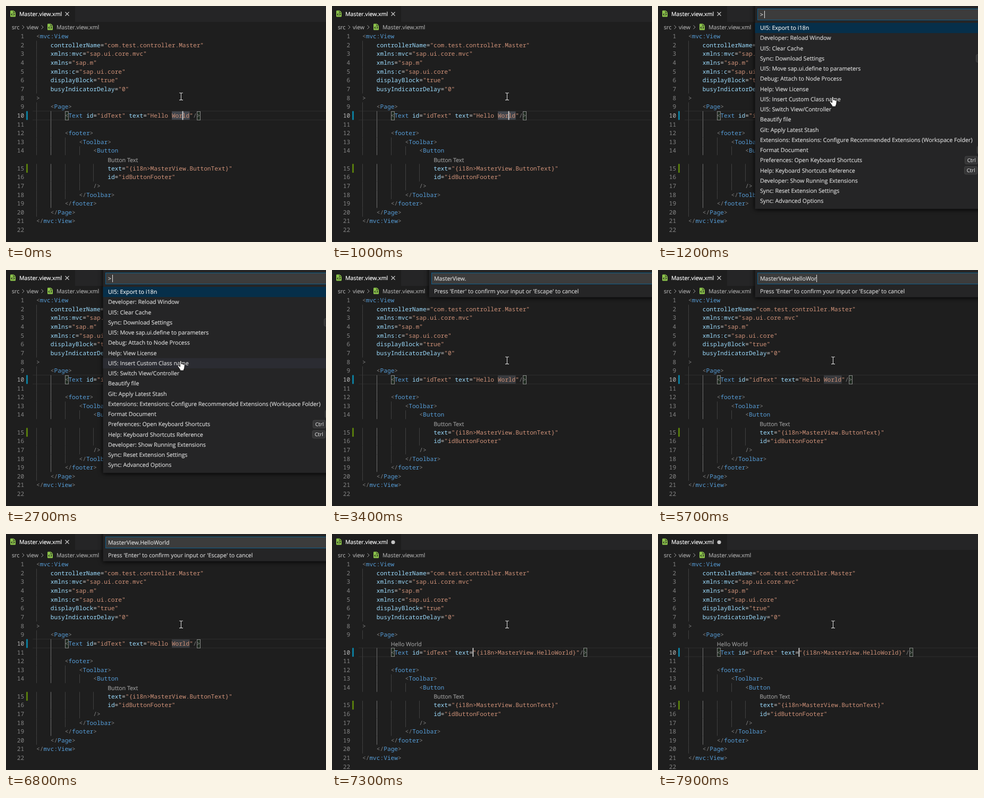
Recreate the animation shown at these times as an HTML page. Size 602x446 px, loop 8000 ms.

```html
<!DOCTYPE html>
<html lang="en">
<head>
<meta charset="utf-8">
<title>Export to i18n</title>
<style>
  html, body { margin: 0; width: 100%; height: 100%; overflow: hidden; background: #1e1e1e; }
  svg { display: block; width: 602px; height: 446px; }
  text { white-space: pre; text-rendering: geometricPrecision; }
  .code { font: 11.18px "Noto Sans Mono", "DejaVu Sans Mono", monospace; }
  .ui { font: 10.66px "Open Sans", "Noto Sans", sans-serif; stroke-width: .2px; }
  .ui.small { font-size: 9.6px; }
  .popup { filter: drop-shadow(0 1px 4px #000); }
</style>
</head>
<body>
<svg id="stage" viewBox="0 0 602 446"></svg>
<script>
const LOOP = 8000;
const CHAR = 6.71, LEFT = 57, LINE = 16.63, FIRST = 57.3;
const OPEN = 1100, HOVER = 1300, PROMPT = 2850, CLOSE = 6880, EDIT = 6980, LENS = 7280;

const COLORS = { punct: '#808080', tag: '#569cd6', attr: '#9cdcfe', string: '#ce9178', plain: '#d4d4d4' };

const SOURCE = `<mvc:View
    controllerName="com.test.controller.Master"
    xmlns:mvc="sap.ui.core.mvc"
    xmlns="sap.m"
    xmlns:c="sap.ui.core"
    displayBlock="true"
    busyIndicatorDelay="0"
>
    <Page>
        <Text id="idText" text="Hello World"/>

        <footer>
            <Toolbar>
                <Button
                    text="{i18n>MasterView.ButtonText}"
                    id="idButtonFooter"
                />
            </Toolbar>
        </footer>
    </Page>
</mvc:View>
`.split('\n');

const COMMANDS = [
  'UI5: Export to i18n', 'Developer: Reload Window', 'UI5: Clear Cache', 'Sync: Download Settings',
  'UI5: Move sap.ui.define to parameters', 'Debug: Attach to Node Process', 'Help: View License',
  'UI5: Insert Custom Class name', 'UI5: Switch View/Controller', 'Beautify file',
  'Git: Apply Latest Stash',
  'Extensions: Extensions: Configure Recommended Extensions (Workspace Folder)',
  'Format Document', 'Preferences: Open Keyboard Shortcuts', 'Help: Keyboard Shortcuts Reference',
  'Developer: Show Running Extensions', 'Sync: Reset Extension Settings', 'Sync: Advanced Options'
];
// Left edge of the shortcut badge, by command index
const BADGES = { 3: 598.5, 12: 600.5, 13: 577.5, 14: 576.5 };

// [column, first line, last line]
const GUIDES = [[0, 2, 7], [0, 9, 20], [4, 10, 19], [8, 13, 18], [12, 14, 17], [16, 15, 16]];
const ACTIVE_COLUMN = 4;

const TYPED = 'HelloWorld';
const KEY_TIMES = [4480, 4580, 4680, 4780, 4970, 5280, 5480, 5680, 5780, 5870];

const escapeXml = s => s.replace(/&/g, '&amp;').replace(/</g, '&lt;').replace(/>/g, '&gt;');
const rect = (x, y, w, h, fill, extra = '') =>
  `<rect x="${x}" y="${y}" width="${w}" height="${h}" fill="${fill}" ${extra}/>`;
const path = (d, stroke, width = 1, fill = 'none') =>
  `<path d="${d}" stroke="${stroke}" stroke-width="${width}" fill="${fill}"/>`;
const label = (x, centre, s, fill, size = '') =>
  `<text class="ui ${size}" x="${x}" y="${centre + 3.7}" fill="${fill}" stroke="${fill}">${escapeXml(s)}</text>`;
const colX = col => LEFT + col * CHAR;
const blink = (elapsed, half) => Math.floor(Math.max(0, elapsed) / half) % 2 === 0;

function highlight(line) {
  const rule = /(<\/?|\/?>)|("[^"]*")|([\w:]+)|([\s=]+)/g;
  let previous = '';
  return line.replace(rule, (token, punct, string, word) => {
    const kind = punct ? 'punct' : string ? 'string'
      : word ? (previous.startsWith('<') ? 'tag' : 'attr') : 'plain';
    previous = token;
    return `<tspan fill="${COLORS[kind]}">${escapeXml(token)}</tspan>`;
  });
}

const fileIcon = (x, y) => `<g transform="translate(${x} ${y})">
  <path d="M1.2 0H6.6L10 3.4V10.8Q10 12 8.8 12H1.2Q0 12 0 10.8V1.2Q0 0 1.2 0Z" fill="#8bc34a"/>
  ${path('M6 .9V4H9.2', '#1e1e1e', .9)}
  ${path('M3.9 5.6L2.1 7.5L3.9 9.4M6.1 5.6L7.9 7.5L6.1 9.4', '#1e1e1e', 1.1)}</g>`;

function header(dirty) {
  const chevron = x => path(`M${x} 36.5l3.5 3.5l-3.5 3.5`, '#a0a0a0');
  return rect(0, 0, 602, 30, '#252526') + rect(0, 0, 130, 30, '#1e1e1e')
    + fileIcon(8, 8.5) + label(25, 15.3, 'Master.view.xml', '#fff')
    + (dirty ? '<circle cx="115" cy="15.5" r="3.6" fill="#c5c5c5"/>'
             : path('M111.5 11.5l7 7m0-7l-7 7', '#d0d0d0', 1.1))
    + label(11, 40, 'src', '#a9a9a9') + chevron(30.5)
    + label(39, 40, 'view', '#a9a9a9') + chevron(66.5)
    + fileIcon(78, 33.5) + label(95, 40, 'Master.view.xml', '#a9a9a9');
}

function editor({ edited, lens, focused, caret }) {
  const lines = SOURCE.slice();
  if (edited) lines[9] = lines[9].replace('Hello World', '{i18n>MasterView.HelloWorld}');
  const centre = n => FIRST + LINE * (n - 1 + (n >= 15) + (lens && n >= 10));
  const active = centre(10), top = active - LINE / 2;
  let out = path(`M50 ${top}H602M50 ${top + LINE}H602`, '#2b2b2b', 1.2);

  for (const [col, from, to] of GUIDES)
    for (let n = from; n <= to; n++)
      out += rect(Math.round(colX(col)), centre(n) - LINE / 2, 1, LINE,
        col === ACTIVE_COLUMN ? '#707070' : '#404040');

  out += rect(38, top, 3, LINE, '#0c7d9d');
  out += rect(38, centre(15) - LINE / 2, 3, LINE, '#587c0c');
  if (!edited) out += rect(colX(38), top + .5, 5 * CHAR, LINE - 1, focused ? '#42464d' : '#383a3e');
  for (const col of [8, lines[9].length - 1])
    out += rect(Math.round(colX(col)) + .5, Math.round(top) + .5, 6, 16, '#1f2a20', 'stroke="#888"');

  lines.forEach((line, i) => {
    const y = centre(i + 1) + 3.9;
    const indent = line.search(/\S|$/);
    out += `<text class="code" x="34.2" y="${y}" text-anchor="end" fill="${i === 9 ? '#b8b8b8' : '#858585'}">${i + 1}</text>`;
    out += `<text class="code" x="${colX(indent)}" y="${y}">${highlight(line.trim())}</text>`;
  });
  out += label(colX(20), centre(15) - LINE + 1, 'Button Text', '#999');
  if (lens) out += label(colX(8), active - LINE + 1.5, 'Hello World', '#999');
  if (caret) out += rect(colX(edited ? 31 : 41) - .5, top, 1.7, LINE, '#d8d8d8');
  return out;
}

function popup(height, text, caretX, body) {
  return `<g class="popup">${rect(182.5, -10, 440, height + 10, '#252526')}</g>`
    + rect(187.5, 5.5, 430, 21, '#3c3c3c', 'stroke="#0d5f8c"')
    + body + label(192, 16.3, text, '#d8d8d8')
    + (caretX ? rect(caretX, 9, 1, 14, '#e8e8e8') : '');
}

function palette(t) {
  const rows = COMMANDS.map((name, i) => {
    const centre = 41.5 + i * 19.24;
    const fill = i === 0 ? '#062f4a' : i === 7 && t >= HOVER ? '#2b2c32' : '';
    const badge = BADGES[i];
    return (fill ? rect(182.5, centre - 9.6, 420, 19.24, fill) : '')
      + label(192, centre, name, i ? '#d6d6d6' : '#f0f0f0')
      + (badge ? rect(badge, centre - 7.5, 24, 14.5, '#353536', 'rx="2.5" stroke="#444"')
          + label(badge + 4.3, centre - .5, badge < 590 ? 'Ctrl' : '', '#d0d0d0', 'small') : '');
  });
  return popup(383.5, '>', blink(t - 1150, 530) && 200, rows.join(''));
}

const ruler = document.createElement('canvas').getContext('2d');
ruler.font = '10.66px "Open Sans", "Noto Sans", sans-serif';

function prompt(t) {
  const count = KEY_TIMES.filter(k => k <= t).length;
  const lastKey = count ? KEY_TIMES[count - 1] : PROMPT;
  const text = 'MasterView.' + TYPED.slice(0, count);
  const caretX = Math.round(192 + ruler.measureText(text).width);
  return popup(51.5, text, blink(t - lastKey, 530) && caretX,
    label(192, 40, "Press 'Enter' to confirm your input or 'Escape' to cancel", '#d0d0d0'));
}

const BEAM = 'M326 164.2h2.4l1 1l1-1h2.4M329.4 165v11.6M326 177.6h2.4l1-1l1 1h2.4';
const ibeam = path(BEAM, '#111', 2.6) + path(BEAM, '#e6e6e6', 1.1);
const hand = path('M327.3 172.3q1.4-1.6 2.7 0v5l1.8.2l1.8.5l1.6.8q1.2.6 1 2.2l-.5 4.3l-1.3 3.2v1.6h-6.8v-1.6l-2.6-3.8l-2-3.2q.2-2 2-1l2.3 2.2z', '#111', 1, '#fff');

function scene(t) {
  const inPalette = t >= OPEN && t < PROMPT;
  const inPrompt = t >= PROMPT && t < CLOSE;
  const focused = !inPalette && !inPrompt;
  return rect(0, 0, 602, 446, '#1e1e1e')
    + header(t >= EDIT)
    + editor({
        edited: t >= EDIT, lens: t >= LENS, focused,
        caret: focused && blink(t < OPEN ? t : t - CLOSE, 500)
      })
    + (inPalette ? palette(t) : inPrompt ? prompt(t) : '')
    + (inPalette ? hand : ibeam);
}

const stage = document.getElementById('stage');
let shown = '';
function frame() {
  const next = scene(performance.now() % LOOP);
  if (next !== shown) stage.innerHTML = shown = next;
  requestAnimationFrame(frame);
}
frame();
</script>
</body>
</html>
```
